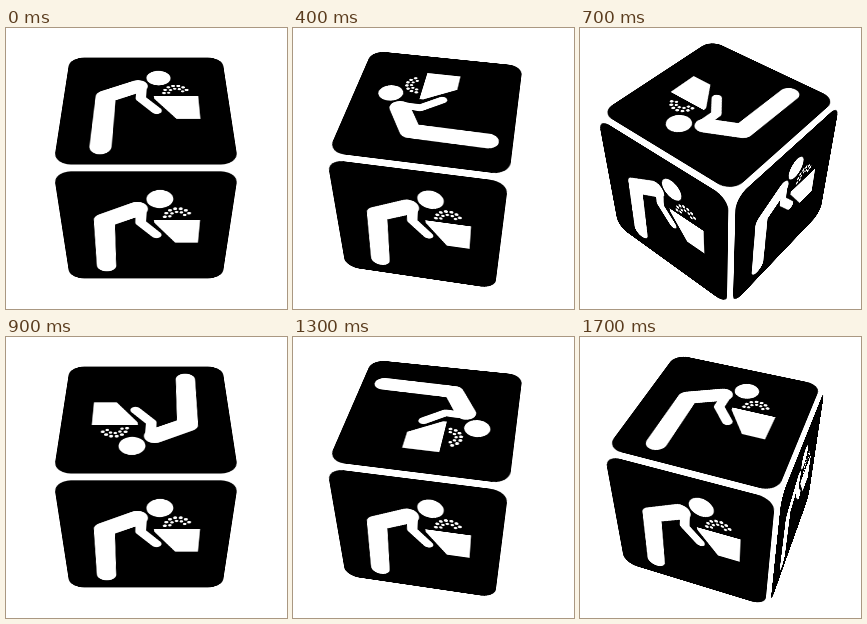
Recreate the animation shown at these times as an HTML page. Size 281 by 281 pixels, loop 1800 ms.

```html
<!DOCTYPE html>
<html lang="en">
<head>
<meta charset="utf-8">
<title>Drinking fountain cube</title>
<style>
  html, body { margin: 0; width: 100%; height: 100%; overflow: hidden; background: #fff; }
  .stage {
    position: relative; width: 281px; height: 281px; overflow: hidden;
    perspective: 606px; perspective-origin: 140.4px 140.2px;
  }
  .cube {
    position: absolute; left: 140.4px; top: 140.2px; width: 0; height: 0;
    transform-style: preserve-3d;
    animation: spin 1800ms steps(18) infinite;
  }
  /* Faces are laid out oversized and scaled down to stay sharp. */
  @keyframes spin {
    from { transform: rotateX(-45deg) rotateY(0deg) scale3d(.6645, .6645, .6645); }
    to { transform: rotateX(-45deg) rotateY(360deg) scale3d(.6645, .6645, .6645); }
  }
  .face {
    position: absolute; left: -120px; top: -120px; width: 240px; height: 240px;
    backface-visibility: hidden;
    transform: rotateY(var(--turn, 0deg)) translateZ(120px);
  }
  .face svg { display: block; width: 100%; height: 100%; }
  .right { --turn: 90deg; }
  .back { --turn: 180deg; }
  .left { --turn: 270deg; }
  .top { transform: rotateX(90deg) translateZ(120px); }
</style>
</head>
<body>
<svg width="0" height="0" style="position:absolute">
  <symbol id="sign" viewBox="-100 -100 200 200">
    <rect x="-95" y="-95" width="190" height="190" rx="18"/>
    <g fill="none" stroke="#fff" stroke-linecap="round" stroke-linejoin="round">
      <path d="M-48 68 L-46.5 -17 L-9.5 -36.5" stroke-width="23.5"/>
      <path d="M-5 -36 L-6 -13.5 L12 8.5" stroke-width="12"/>
      <path d="M21 -23.5 A14 14 0 0 1 48.5 -27" stroke-width="4.4" stroke-dasharray="0 6.2"/>
      <path d="M26.5 -24 A8.5 8.5 0 0 1 43 -26" stroke-width="4" stroke-dasharray="0 5.6"/>
    </g>
    <g fill="#fff">
      <circle cx="15" cy="-52.5" r="14.5"/>
      <path d="M9 -17.5 H60.5 V23 H34 L9.5 -13 Z"/>
    </g>
  </symbol>
</svg>
<div class="stage">
  <div class="cube">
    <div class="face"><svg><use href="#sign"/></svg></div>
    <div class="face right"><svg><use href="#sign"/></svg></div>
    <div class="face back"><svg><use href="#sign"/></svg></div>
    <div class="face left"><svg><use href="#sign"/></svg></div>
    <div class="face top"><svg><use href="#sign"/></svg></div>
  </div>
</div>
</body>
</html>
```
